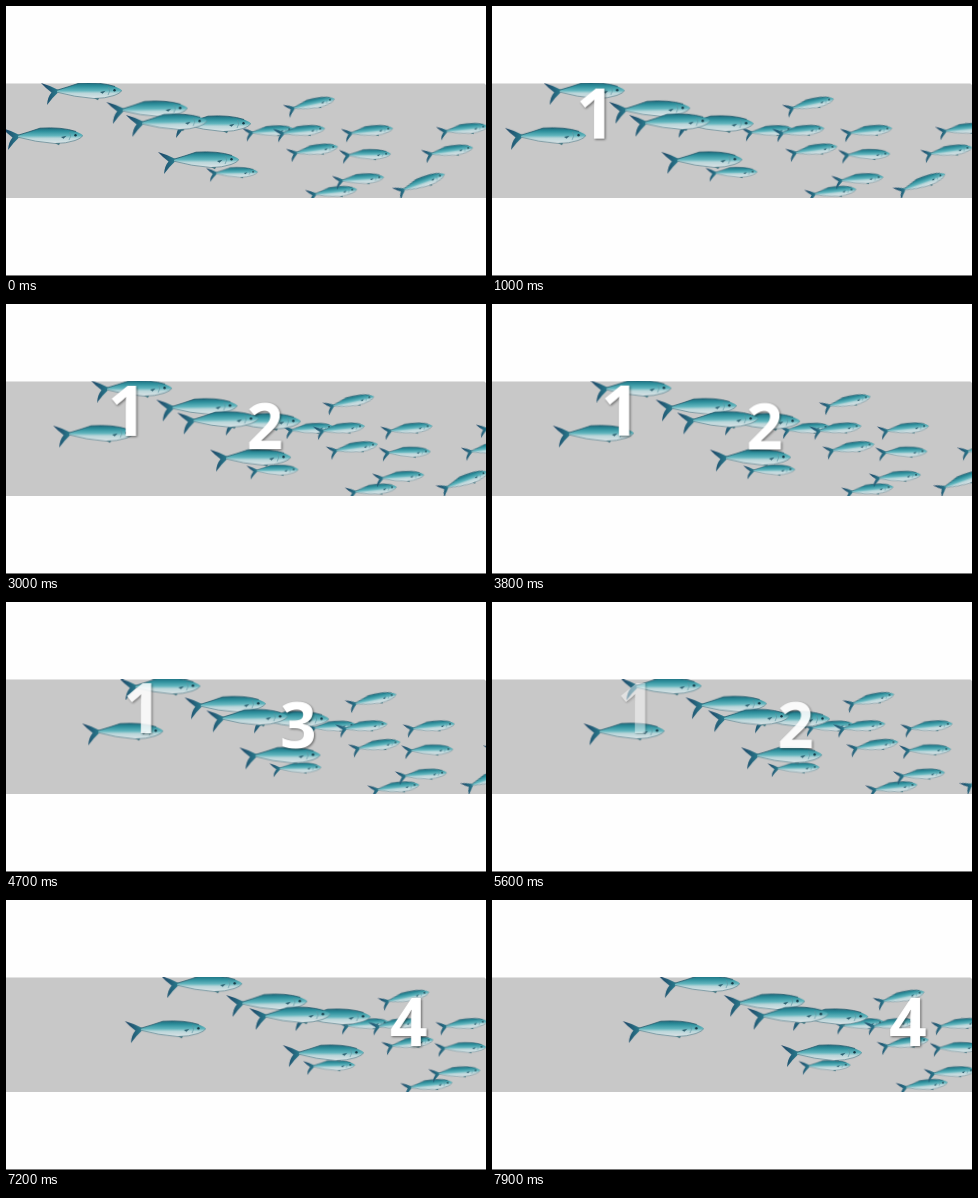
An HTML page that plays this animation: 480x270 px, repeating every 8000 ms.

```html
<!DOCTYPE html>
<html lang="en">
<head>
<meta charset="utf-8">
<title>Fish count</title>
<style>
  html, body { margin: 0; width: 100%; height: 100%; overflow: hidden; background: #fefefe; }
  svg { display: block; width: 480px; height: 270px; }
  .swim { animation: swim 8s steps(80, end) infinite; }
  @keyframes swim {
    from { transform: translate(0, 0); }
    to { transform: translate(var(--dx), var(--dy, -1px)); }
  }
  .digit {
    font: 700 64px "Open Sans", "Noto Sans", sans-serif;
    fill: #fff;
    filter: drop-shadow(1px 1.5px 1px rgba(0, 0, 0, .5));
    animation: 8s linear infinite;
  }
  .one { font-size: 69px; animation-name: one; }
  .two { animation-name: two; }
  .three { animation-name: three; }
  .four { font-size: 66px; animation-name: four; }
  @keyframes one {
    0%, 7.5% { opacity: 0; }
    11.25%, 55% { opacity: 1; }
    58.75% { opacity: .85; }
    81.25% { opacity: .07; }
    85%, 100% { opacity: 0; }
  }
  @keyframes two {
    0%, 20% { opacity: 0; }
    23.75%, 52.5% { opacity: 1; }
    55%, 66.25% { opacity: 0; }
    70% { opacity: .9; }
    81.25% { opacity: .45; }
    90%, 100% { opacity: 0; }
  }
  @keyframes three {
    0%, 52.5% { opacity: 0; }
    55%, 66.25% { opacity: 1; }
    70%, 100% { opacity: 0; }
  }
  @keyframes four {
    0%, 73.75% { opacity: 0; }
    77.5%, 100% { opacity: 1; }
  }
</style>
</head>
<body>
<svg viewBox="0 0 480 270">
  <defs>
    <linearGradient id="skin" x1="0" y1="0" x2="0" y2="1">
      <stop offset="0" stop-color="#1d6c7d"/>
      <stop offset=".22" stop-color="#2f909d"/>
      <stop offset=".5" stop-color="#62b6be"/>
      <stop offset=".66" stop-color="#b9d6da"/>
      <stop offset="1" stop-color="#dde4e7"/>
    </linearGradient>
    <linearGradient id="fin" x1="0" x2="1">
      <stop offset="0" stop-color="#1b4163"/>
      <stop offset="1" stop-color="#2c8594"/>
    </linearGradient>
    <g id="fish">
      <path d="M0 0Q9 2.500 18 7.200L20 8.500L17 9.500Q11 15 6 22Q6.500 14 10.500 9.500Q5 5.500 0 0Z" fill="url(#fin)"/>
      <path d="M16 7.200Q27 4 38 .2Q60 -1.200 74 3.500Q79 5.500 81 7.500Q79 10.500 73 12.500Q64 15.500 53 15.500Q33 14 16 9.200Z" fill="url(#skin)"/>
      <path d="M16 9.200Q33 14 53 15.500Q64 15.500 73 12.500Q79 10.500 81 7.500" fill="none" stroke="#5b818d" stroke-width=".7"/>
      <path d="M16 7.200Q27 4 38 .2Q60 -1.200 74 3.500" fill="none" stroke="#1b5568" stroke-width=".8"/>
      <path d="M53 15.300l4 2 1-2.200z" fill="#467783"/>
      <path d="M59 9l5.500-1.200-3 3z" fill="#2b5f70"/>
      <path d="M67.500 4q2.500 4.500-.5 8" fill="none" stroke="#5d95a2" stroke-width=".7"/>
      <circle cx="73.500" cy="7.200" r="1.200" fill="#123643"/>
    </g>
    <clipPath id="water"><rect y="77.500" width="480" height="114.500"/></clipPath>
  </defs>
  <path d="M0 77.500H478.500L480 79V192H0Z" fill="#c8c8c8"/>
  <g clip-path="url(#water)">
    <g id="school"></g>
    <g class="swim" style="--dx:71px;--dy:-3px"><text class="digit one" x="75" y="133">1</text></g>
    <g class="swim" style="--dx:137.600px;--dy:3px"><text class="digit two" x="189" y="143.500">2</text></g>
    <g class="swim" style="--dx:137.600px;--dy:2px"><text class="digit three" x="193" y="144.500">3</text></g>
    <g class="swim" style="--dx:152px;--dy:0px"><text class="digit four" x="247" y="145.500">4</text></g>
  </g>
  <rect y="269" width="480" height="1" fill="#777"/>
</svg>
<script>
  const NEAR = 1, FAR = 0.64;

  // tail x, tail y, tilt in degrees, size, drift over one loop
  const school = [
    [430, 121, -6, FAR, 106], [415, 144, -8, FAR, 106], [386, 182, -20, 0.67, 116],
    [335, 123, -6, FAR, 105], [333, 144, -1, FAR, 106], [299, 184, -6, FAR, 106],
    [326, 170, -4, FAR, 107], [277, 99, -12, FAR, 105], [280, 143, -8, FAR, 106],
    [236, 122, -4, FAR, 106], [267, 123, -6, FAR, 106], [200, 162, -1, FAR, 108],
    [164, 110, 0, NEAR, 132.800], [100.500, 96, -1, NEAR, 133], [120, 109, -1, NEAR, 137],
    [152, 146, 0, NEAR, 138.700], [35, 77, 0, NEAR, 133.500], [-4, 122, 0, NEAR, 136.500]
  ];

  document.getElementById("school").innerHTML = school.map(
    ([x, y, tilt, size, dx]) =>
      `<g class="swim" style="--dx:${dx}px"><use href="#fish" transform="translate(${x} ${y}) rotate(${tilt}) scale(${size})"/></g>`
  ).join("");
</script>
</body>
</html>
```
